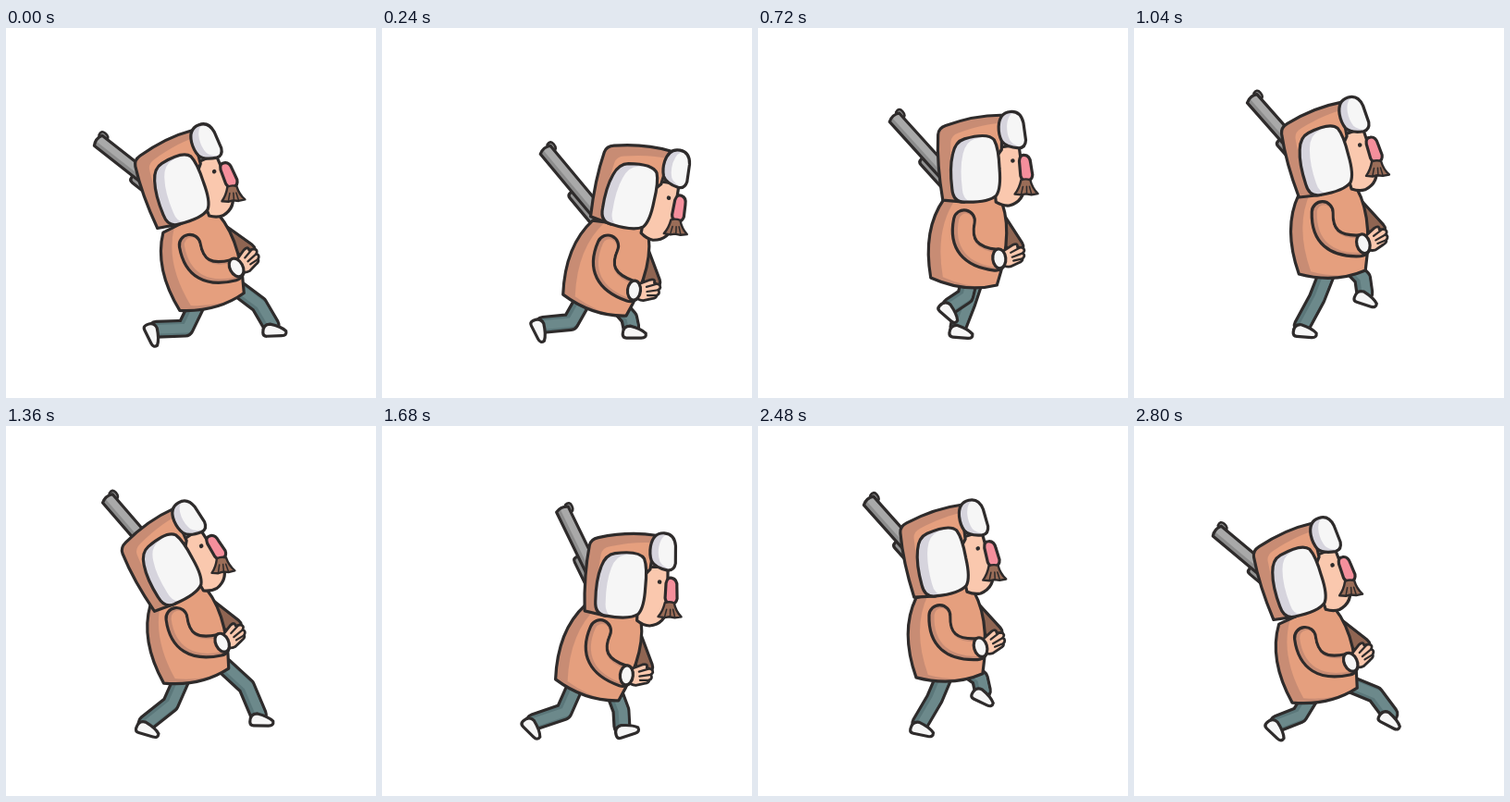
Recreate the animation shown at these times as an HTML page with a canvas. Size 400x400 px, loop 2.88 s.

```html
<!DOCTYPE html>
<html>
<head>
<meta charset="utf-8">
<style>
  html, body { margin: 0; width: 100%; height: 100%; overflow: hidden; background: #fff; }
  canvas { display: block; }
</style>
</head>
<body>
<canvas id="stage" width="400" height="400"></canvas>
<script>
const ctx = document.getElementById('stage').getContext('2d');
const LOOP = 2880, STRIDE = LOOP / 2, TICK = 80, RAD = Math.PI / 180;
const INK = '#2e2b2b', COAT = '#e59f7e', COAT_DARK = '#c88c74', WHITE = '#f6f6f6', LILAC = '#d6d4dd',
  TEAL = '#6c898b', TEAL_DARK = '#5b777a', SKIN = '#fac8ae', BROWN = '#8f6552', TACHE = '#9a6d58';

const mod = (a, n) => (a % n + n) % n;
const wave = (t, peak, period = LOOP) => Math.cos((t - peak) / period * 2 * Math.PI);

// Quick eased rise from start to peak, then a steady fall, once per stride
function lunge(t, start, peak) {
  const u = mod(t - start, STRIDE), rise = peak - start, r = u / rise;
  return r < 1 ? r * r * (3 - 2 * r) : 1 - (u - rise) / (STRIDE - rise);
}

// One leg's cycle: time, x from the pelvis, y, foot tilt, knee bend
const GAIT = [
  [0, 67, 327, -16, 5], [480, 18, 329, 3, 1], [1040, -30, 328, 8, 2], [1360, -53, 328, 30, 8],
  [1440, -64, 331, 50, 16], [1960, -43, 318, 50, 9], [2480, 36, 293, 22, 5], [2800, 70, 318, 14, 7]
];

function gait(time) {
  const t = mod(time, LOOP), n = GAIT.length;
  const at = i => GAIT[mod(i, n)].map((v, k) => k ? v : v + Math.floor(i / n) * LOOP);
  const i = GAIT.filter(row => row[0] <= t).length - 1;
  const [a, b, c, d] = [i - 1, i, i + 1, i + 2].map(at);
  const span = c[0] - b[0], u = (t - b[0]) / span, v = 1 - u;
  return [1, 2, 3, 4].map(k => b[k] * (1 + 2 * u) * v * v + c[k] * u * u * (3 - 2 * u)
    + span * u * v * (v * (c[k] - a[k]) / (c[0] - a[0]) - u * (d[k] - b[k]) / (d[0] - b[0])));
}

const shapes = {
  coat: 'M-30-87Q-50-52-36-1Q2 12 36 0Q50-64 28-98Z',
  farArm: 'M29-72L52-43',
  sleeve: 'M-6-66Q-10-28 32-27',
  hat: 'M-37 29C-39 5-39-20-36-42Q-35-49-27-51C-5-57 15-59 35-57L31-20L-14 33Z',
  face: 'M20-22L50-24L52 20Q51 38 34 41Q27 41 20 36Z',
  ear: 'M-8-35Q18-40 24-31Q28-22 27 0Q27 22 21 29Q12 36-14 33Q-26 32-26 18Q-27-5-22-20Q-18-33-8-35Z',
  brim: 'M30-45Q32-60 44-60Q55-60 57-47L58-28Q57-20 50-20Q36-22 32-29Q29-36 30-45Z',
  nose: 'M49-6Q50-13 55-12Q61-11 61-3L62 10Q61 16 56 16Q50 16 49 10Z',
  moustache: 'M-5-1Q0-3 5-1Q7 8 13 14L6 15L0 14L-5 15L-12 14Q-7 8-5-1Z',
  bristles: 'M-3 6L-5 14M1 6V14M4 6L6 14',
  hand: 'M8-8L20-14Q26-16 25-11L30-10Q34-7 30-4Q33-1 29 2Q29 5 24 6L15 9Q9 9 8 6Z',
  fingers: 'M17-6L27-10M18-1L30-4M19 3L29 2',
  shoe: 'M-12 2Q-12-7-4-7Q8-4 13 1Q14 6 8 6L-8 6Q-12 6-12 2Z',
  barrel: 'M0-7L110-7V7H0Q-4 0 0-7Z',
  stock: 'M53 3H110V13H57Q53 13 53 9Z',
  sight: 'M-3-5Q-5-11 1-11Q8-11 7-5Z'
};
for (const name in shapes) shapes[name] = new Path2D(shapes[name]);

function outline(path, width = 3.2) {
  ctx.lineWidth = width;
  ctx.strokeStyle = INK;
  ctx.stroke(path);
}

// Shape with a darker band along one side
function solid(path, color, shade = color, dx = 0, dy = 0, line) {
  ctx.save();
  ctx.clip(path);
  ctx.fillStyle = shade;
  ctx.fill(path);
  ctx.translate(dx, dy);
  ctx.fillStyle = color;
  ctx.fill(path);
  ctx.restore();
  outline(path, line);
}

function limb(path, width, color, shade) {
  outline(path, width);
  ctx.lineWidth = width - 6.4;
  ctx.strokeStyle = shade;
  ctx.stroke(path);
  ctx.save();
  ctx.translate(2, 0);
  ctx.lineWidth = width - 10.4;
  ctx.strokeStyle = color;
  ctx.stroke(path);
  ctx.restore();
}

function placed(x, y, degrees, draw) {
  ctx.save();
  ctx.translate(x, y);
  ctx.rotate(degrees * RAD);
  draw();
  ctx.restore();
}

function ellipse(x, y, rx, ry) {
  const path = new Path2D();
  path.ellipse(x, y, rx, ry, 0, 0, 7);
  return path;
}

// Offset (x, y) turned by an angle and added to an origin
function turned(origin, degrees, x, y) {
  const c = Math.cos(degrees * RAD), s = Math.sin(degrees * RAD);
  return [origin[0] + x * c - y * s, origin[1] + x * s + y * c];
}

function drawLeg(hip, foot, tilt, bend) {
  const ankle = turned(foot, tilt, -3, -6);
  const dx = ankle[0] - hip[0], dy = ankle[1] - hip[1], k = bend / Math.hypot(dx, dy);
  const path = new Path2D();
  path.moveTo(...hip);
  path.lineTo(hip[0] + dx / 2 + dy * k, hip[1] + dy / 2 - dx * k);
  path.lineTo(...ankle);
  limb(path, 20, TEAL, TEAL_DARK);
  placed(...foot, tilt, () => solid(shapes.shoe, WHITE));
}

function drawRifle() {
  solid(shapes.sight, '#8f8f8f', '#8f8f8f', 0, 0, 2.6);
  solid(shapes.stock, '#929292');
  solid(shapes.barrel, '#a9a9a9', '#8c8c8c', 0, -5);
}

function drawTorso() {
  solid(shapes.coat, COAT, COAT_DARK, 13, -2);
  limb(shapes.sleeve, 26, COAT, COAT_DARK);
  placed(32, -27, -12, () => {
    solid(shapes.hand, SKIN, SKIN, 0, 0, 2.8);
    outline(shapes.fingers, 2.2);
    solid(ellipse(4, -1, 7, 10.5), WHITE);
  });
}

function drawHead(tilt) {
  solid(shapes.face, SKIN);
  solid(shapes.hat, COAT, COAT_DARK, 13, 9);
  solid(shapes.ear, WHITE, LILAC, 11, 1);
  solid(shapes.brim, WHITE, LILAC, 9, 0);
  ctx.fillStyle = INK;
  ctx.fill(ellipse(42, -7, 2.3, 2.3));
  solid(shapes.nose, '#f58f9c');
  placed(54, 16, -tilt * 0.8, () => {
    solid(shapes.moustache, TACHE, TACHE, 0, 0, 2.4);
    outline(shapes.bristles, 1.5);
  });
}

function draw(t) {
  const accent = wave(t, 0) ** 3, swing = wave(t, 310);
  const lean = -16 + 35 * lunge(t, 0, 270);
  const tilt = lean - 10.5 + 6 * accent;
  const pelvis = [
    205 + 24 * lunge(t, -100, 60) + 6 * wave(t, 620),
    280 + 13 * wave(t, 260, STRIDE) + 11 * accent
  ];
  const head = turned(pelvis, lean, 0, -121 - 4 * accent);
  const muzzle = turned(head, 41 - 12 * swing, -104, 0);

  ctx.fillStyle = '#fff';
  ctx.fillRect(0, 0, 400, 400);
  ctx.lineCap = ctx.lineJoin = 'round';

  placed(...muzzle, 50 - 7 * swing + 0.4 * lean, drawRifle);
  for (const phase of [t, t + STRIDE]) {
    const [x, y, roll, bend] = gait(phase);
    const hip = turned(pelvis, lean, 9 + 24 * wave(phase, 60), -4);
    drawLeg(hip, [pelvis[0] + x, y], roll + 14 * accent, bend);
  }
  placed(...pelvis, lean, () => {
    limb(shapes.farArm, 20, BROWN, BROWN);
    drawTorso();
  });
  placed(...head, tilt, () => drawHead(tilt));
}

function frame(now) {
  draw(Math.floor(now / TICK) * TICK % LOOP);
  requestAnimationFrame(frame);
}
draw(0);
requestAnimationFrame(frame);
</script>
</body>
</html>
```
